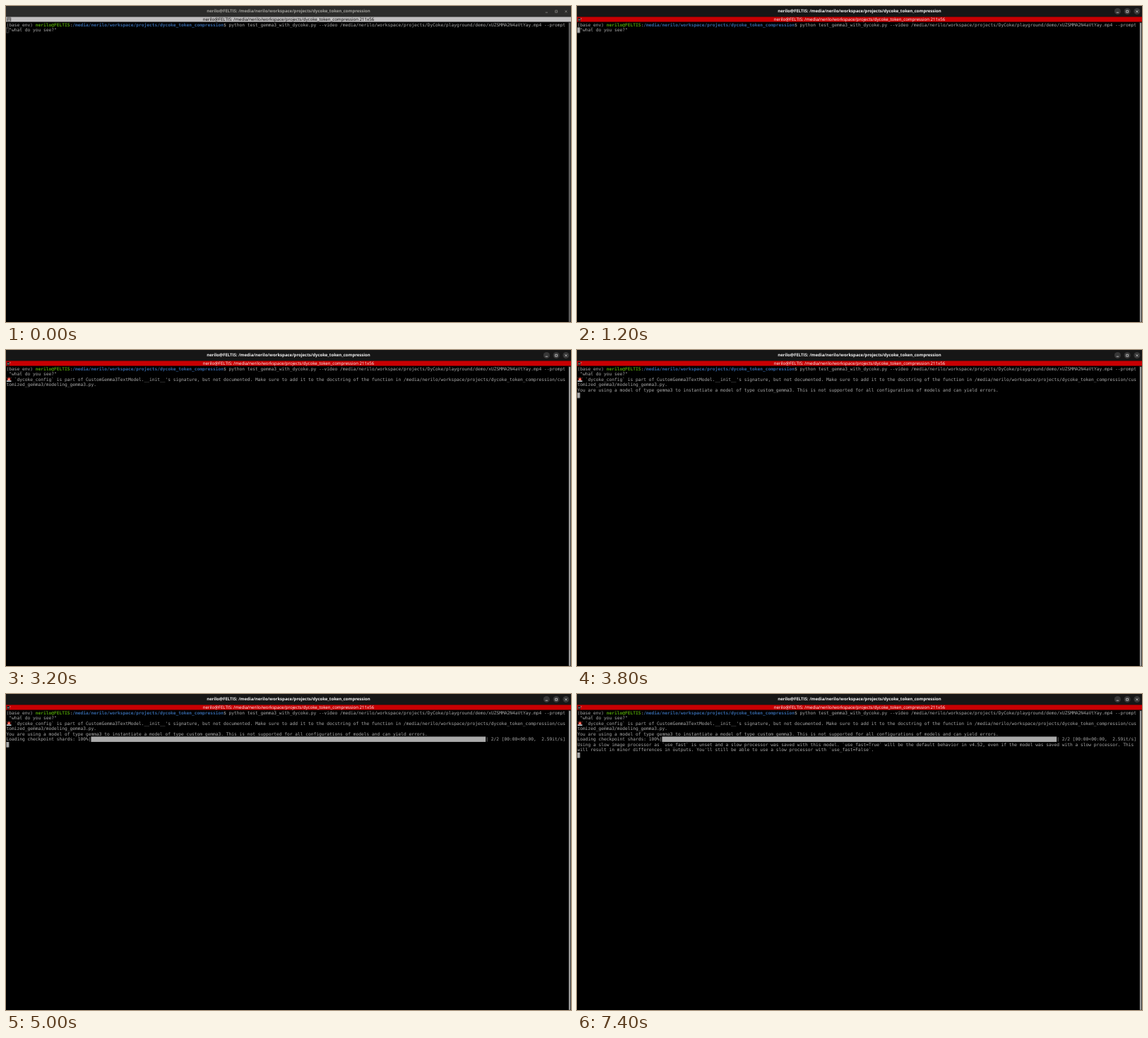
Write an HTML page that moves like this. It is 800x448 px and loops after 8 s.

```html
<!DOCTYPE html>
<html lang="en">
<head>
<meta charset="utf-8">
<title>Terminal session</title>
<style>
html, body { margin: 0; width: 100%; height: 100%; overflow: hidden; background: #000; }
/* Desktop coordinates: 1920 wide, character cells about 9 x 18 */
.screen {
  position: absolute; width: 1920px; height: 1075.2px;
  transform: scale(.4166667); transform-origin: 0 0;
  overflow: hidden; text-rendering: geometricPrecision;
}
.screen > * { position: absolute; }
.header, .tab {
  left: 0; width: 1920px; text-align: center; white-space: pre;
  font-family: "Open Sans", sans-serif;
}
.header { top: 0; height: 37px; line-height: 36px; font-weight: 700; font-size: 14.4px; }
.tab { top: 37px; height: 17px; line-height: 17px; font-size: 14.66px; }
.icons { left: 0; top: 0; fill: none; stroke-width: 1.6; }
.scroll { right: 0; top: 55px; width: 9px; bottom: 0; background: #262626; }
.scroll::after { content: ""; position: absolute; left: 2px; width: 5px; top: 2px; bottom: 0; border-radius: 3px; background: #8c8c8c; }
.term {
  left: 1px; top: 55.4px; color: #aaa; white-space: pre;
  font: 14.965px/18px "DejaVu Sans Mono", monospace;
}
.row { position: absolute; left: 0; top: calc(var(--r) * 18px); height: 18px; }
.user { color: #4e9a06; font-weight: 700; }
.path { color: #3465a4; font-weight: 700; }
.bar {
  display: inline-block; vertical-align: top; width: 149ch; height: 18px;
  background: linear-gradient(#aaa 0 0) 0 / var(--done) 100% no-repeat;
}
.siren { position: absolute; left: 0; top: 0; }
.cursor { width: 9px; box-sizing: border-box; border: 1.4px solid #aaa; background: #aaa; }

.header, .tab, .idle, .live, .scroll::after, .cursor, .step { animation: 8s step-end infinite; }
.header { animation-name: header; }
.tab { animation-name: tab; }
.idle { animation-name: idle; }
.live { animation-name: live; }
.scroll::after { animation-name: scroll; }
.cursor { animation-name: cursor; }
.warn { animation-name: warn; }
.model { animation-name: model; }
.load0 { animation-name: load0; }
.load1 { animation-name: load1; }
.load2 { animation-name: load2; }
.slow { animation-name: slow; }

@keyframes header {
  0% { background: #2c2c2b; color: #a09f9a; }
  10% { background: #1c1c1c; color: #e6e6e6; }
  12.5%, to { background: #161616; color: #f2f2f2; }
}
@keyframes tab {
  0% { background: #c0bebf; color: #000; }
  10%, to { background: #c80003; color: #fff; }
}
@keyframes scroll { 0% { background: #606060; } 10%, to { background: #a0a0a0; } }
@keyframes idle { 0% { opacity: 1; } 10%, to { opacity: 0; } }
@keyframes live { 0% { opacity: 0; } 10%, to { opacity: 1; } }
@keyframes warn { 0% { opacity: 0; } 40%, to { opacity: 1; } }
@keyframes model { 0% { opacity: 0; } 42.5%, to { opacity: 1; } }
@keyframes load0 { 0% { opacity: 0; } 52.5% { opacity: 1; } 57.5%, to { opacity: 0; } }
@keyframes load1 { 0% { opacity: 0; } 57.5% { opacity: 1; } 62.5%, to { opacity: 0; } }
@keyframes load2 { 0% { opacity: 0; } 62.5%, to { opacity: 1; } }
@keyframes slow { 0% { opacity: 0; } 80%, to { opacity: 1; } }
@keyframes cursor {
  0% { top: 18px; opacity: 1; background: transparent; }
  10% { background: #aaa; }
  17.5% { top: 36px; }
  25% { opacity: 0; }
  32.5% { opacity: 1; }
  40% { opacity: 0; }
  47.5% { top: 90px; opacity: 1; }
  52.5% { opacity: 0; }
  62.5% { top: 108px; opacity: 1; }
  70% { opacity: 0; }
  77.5% { opacity: 1; }
  80% { top: 144px; }
  85% { opacity: 0; }
  92.5%, to { top: 144px; opacity: 1; background: #aaa; }
}
</style>
</head>
<body>
<div class="screen">
  <div class="header">nerilo@FELTIS: /media/nerilo/workspace/projects/dycoke_token_compression</div>
  <div class="tab">nerilo@FELTIS: /media/nerilo/workspace/projects/dycoke_token_compression 211x56</div>
  <svg class="icons" width="1920" height="56">
    <defs>
      <path id="glyphs" d="M1833 22h8M1866.500 15h7v7h-7zM1899.500 15l7 7m0-7l-7 7"/>
    </defs>
    <g class="idle">
      <use href="#glyphs" stroke="#a09f9a"/>
      <path d="M4 39.500h12v12h-12zM4 45.500h12M10 39.500v6" stroke="#222"/>
    </g>
    <g class="live">
      <g fill="#373737">
        <circle cx="1837" cy="18" r="11"/>
        <circle cx="1870" cy="18" r="11"/>
        <circle cx="1903" cy="18" r="11"/>
      </g>
      <use href="#glyphs" stroke="#f2f2f2"/>
      <path d="M3 41h9v11h-9z" fill="#222"/>
      <path d="M4 47h7M14 41v4" stroke="#ddd"/>
    </g>
  </svg>
  <div class="scroll"></div>
  <div class="term">
    <div class="row" style="--r:0">(base_env) <span class="user">nerilo@FELTIS</span>:<span class="path">/media/nerilo/workspace/projects/dycoke_token_compression</span>$ python test_gemma3_with_dycoke.py --video /media/nerilo/workspace/projects/DyCoke/playground/demo/xUZSMMA2N4aVtYay.mp4 --prompt</div>
    <div class="row" style="--r:1"> "what do you see?"</div>
    <div class="row step warn" style="--r:2"><svg class="siren" width="18" height="18"><path d="M4 13V8a5 5 0 0 1 10 0v5z" fill="#e5392f"/><path d="M1 13h16v4H1z" fill="#b9c3c9"/><path d="M9 0v2M1 3l2 2M17 3l-2 2" stroke="#f0705f" stroke-width="1.500"/><circle cx="9" cy="9" r="2" fill="#ffd0b8"/></svg>   `dycoke_config` is part of CustomGemma3TextModel.__init__'s signature, but not documented. Make sure to add it to the docstring of the function in /media/nerilo/workspace/projects/dycoke_token_compression/cus</div>
    <div class="row step warn" style="--r:3">tomized_gemma3/modeling_gemma3.py.</div>
    <div class="row step model" style="--r:4">You are using a model of type gemma3 to instantiate a model of type custom_gemma3. This is not supported for all configurations of models and can yield errors.</div>
    <div class="row step load0" style="--r:5">Loading checkpoint shards:   0%|<span class="bar" style="--done:0%;width:157ch"></span>| 0/2 [00:00&lt;?, ?it/s]</div>
    <div class="row step load1" style="--r:5">Loading checkpoint shards:  50%|<span class="bar" style="--done:50%"></span>| 1/2 [00:00&lt;00:00,  2.14it/s]</div>
    <div class="row step load2" style="--r:5">Loading checkpoint shards: 100%|<span class="bar" style="--done:100%"></span>| 2/2 [00:00&lt;00:00,  2.59it/s]</div>
    <div class="row step slow" style="--r:6">Using a slow image processor as `use_fast` is unset and a slow processor was saved with this model. `use_fast=True` will be the default behavior in v4.52, even if the model was saved with a slow processor. This</div>
    <div class="row step slow" style="--r:7">will result in minor differences in outputs. You'll still be able to use a slow processor with `use_fast=False`.</div>
    <div class="row cursor"></div>
  </div>
</div>
</body>
</html>
```
